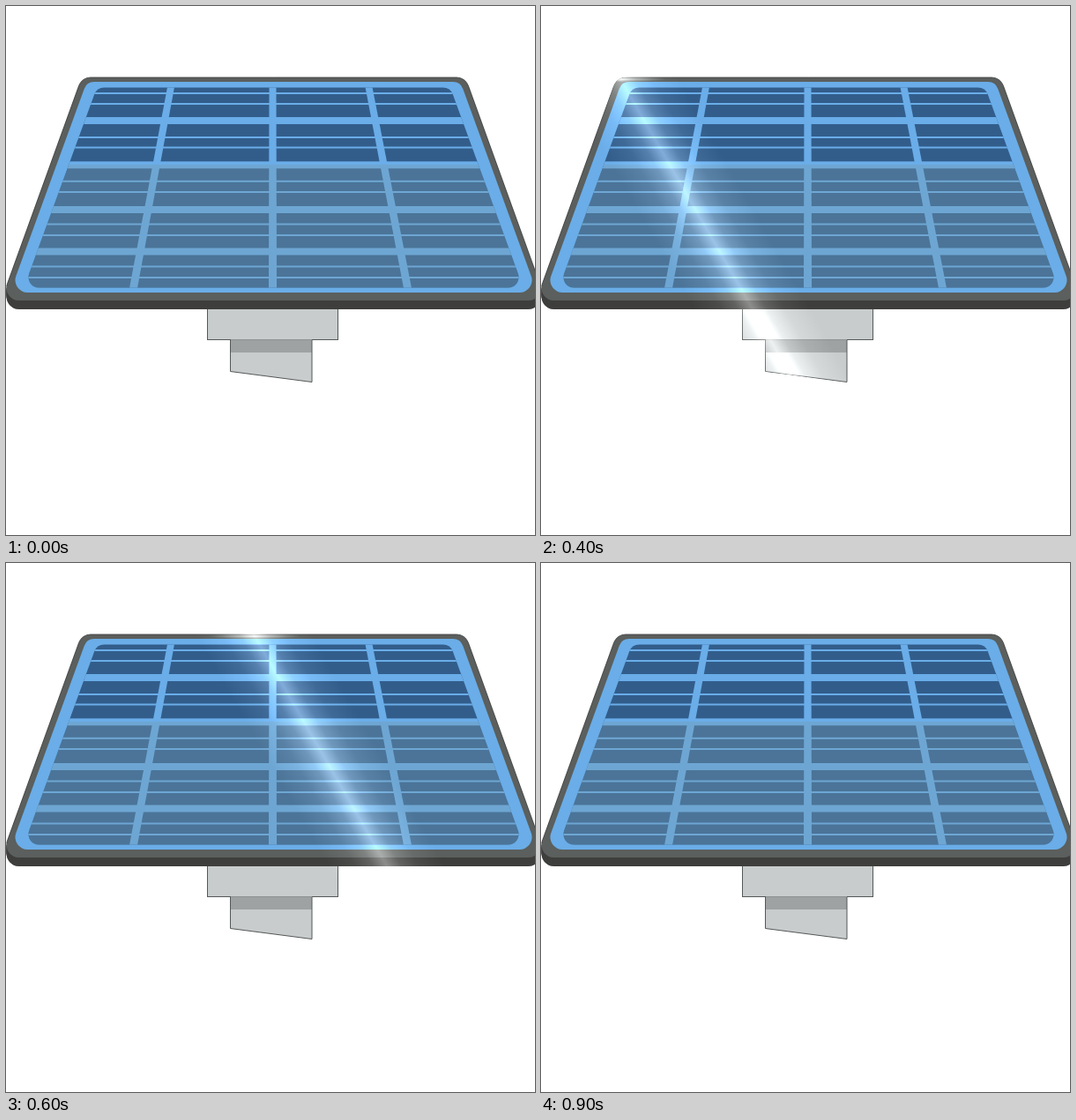
These frames come from a looping animation (600x600 px, 1 s). An HTML page with a canvas:

```html
<!DOCTYPE html>
<html>
<head>
<meta charset="utf-8">
<title>Solar panel</title>
<style>
  html, body { margin: 0; width: 100%; height: 100%; overflow: hidden; background: #fff; }
  canvas { display: block; width: 600px; height: 600px; }
</style>
</head>
<body>
<canvas id="stage" width="600" height="600"></canvas>
<script>
const ctx = document.getElementById('stage').getContext('2d');
const AXIS = 303.5;
const BLUE = '#6aade8';

// Trapezoid, symmetric about AXIS, with rounded corners.
function trapezoid(yTop, xTop, yBottom, xBottom, rTop, rBottom) {
  const mirror = x => 2 * AXIS - x;
  const path = new Path2D();
  path.moveTo(AXIS, yTop);
  path.arcTo(mirror(xTop), yTop, mirror(xBottom), yBottom, rTop);
  path.arcTo(mirror(xBottom), yBottom, xBottom, yBottom, rBottom);
  path.arcTo(xBottom, yBottom, xTop, yTop, rBottom);
  path.arcTo(xTop, yTop, AXIS, yTop, rTop);
  path.closePath();
  return path;
}

const frame = trapezoid(81, 86, 334, -5.4, 14, 14);
const border = trapezoid(86, 91.6, 325, 4.5, 12, 14);
const cells = trapezoid(92.5, 103, 319.5, 20.3, 12, 12);

function fill(color, path) {
  ctx.fillStyle = color;
  ctx.fill(path);
}

function rect(color, x, y, w, h) {
  ctx.fillStyle = color;
  ctx.fillRect(x, y, w, h);
}

function polygon(...points) {
  return new Path2D('M' + points.join('L') + 'Z');
}

function drawStand() {
  const foot = polygon([254.5, 378], [347, 378], [347, 426.5], [254.5, 414.5]);
  ctx.lineWidth = 1;
  ctx.strokeStyle = '#555858';
  fill('#c8cccc', foot);
  rect('#9ea2a3', 255, 378, 92, 15);
  ctx.stroke(foot);
  rect('#c8cccc', 228, 343, 149, 35.5);
  ctx.strokeRect(228.5, 343.5, 148, 35);
  rect('#c8cccc', 255, 378, 92, 0.5);
}

function drawPanel() {
  for (let drop = 10; drop > 0; drop--) {
    ctx.save();
    ctx.translate(0, drop);
    fill('#3e3f3d', frame);
    ctx.restore();
  }
  fill('#5b5f5d', frame);
  ctx.lineWidth = 0.8;
  ctx.strokeStyle = '#3a3c3b';
  ctx.save();
  ctx.beginPath();
  ctx.rect(0, 0, 600, 318);
  ctx.clip();
  ctx.stroke(frame);
  ctx.restore();
  fill(BLUE, border);

  ctx.save();
  ctx.clip(cells);
  rect('#325d8b', 0, 80, 600, 250);
  for (const y of [126, 176.3, 227, 274.5]) rect(BLUE, 0, y, 600, 8);
  for (const y of [99, 111, 149, 160.5, 198.8, 211, 247.5, 260, 295.5, 308]) {
    rect(BLUE, 0, y - 1, 600, 2);
  }
  for (const [top, bottom] of [[187, 144.5], [302.5, 302.5], [411.5, 455.5]]) {
    fill(BLUE, polygon([top - 4, 92], [top + 4, 92], [bottom + 4.5, 320], [bottom - 4.5, 320]));
  }
  rect('rgba(117,155,174,0.37)', 0, 180, 600, 150);
  ctx.restore();
}

// Slanted additive light band; x is its centre at y = 335.
function drawSheen(x) {
  const slope = 0.575, reach = 66;
  const white = a => `rgba(255,255,255,${a})`;
  ctx.save();
  ctx.globalCompositeOperation = 'lighter';

  ctx.save();
  ctx.transform(1, 0, slope, 1, x - slope * 335, 0);
  const band = ctx.createLinearGradient(-reach, 0, reach, 0);
  for (const [d, a] of [[0, 0.31], [0.08, 0.26], [0.25, 0.14], [0.55, 0.05], [1, 0]]) {
    band.addColorStop(0.5 - d / 2, white(a));
    band.addColorStop(0.5 + d / 2, white(a));
  }
  rect(band, -reach, 78, 2 * reach, 352);
  ctx.restore();

  // Glint along the top edge of the frame.
  ctx.clip(frame);
  ctx.translate(x - slope * 252, 83);
  ctx.scale(1, 0.06);
  const glint = ctx.createRadialGradient(0, 0, 0, 0, 0, 52);
  glint.addColorStop(0, white(0.35));
  glint.addColorStop(1, white(0));
  rect(glint, -52, -52, 104, 104);
  ctx.restore();
}

function draw(now) {
  const step = Math.floor((now % 1000) / 100);
  rect('#fff', 0, 0, 600, 600);
  drawStand();
  drawPanel();
  if (step >= 2 && step <= 8) drawSheen(43 + 96 * (step - 2));
  requestAnimationFrame(draw);
}

requestAnimationFrame(draw);
</script>
</body>
</html>
```
